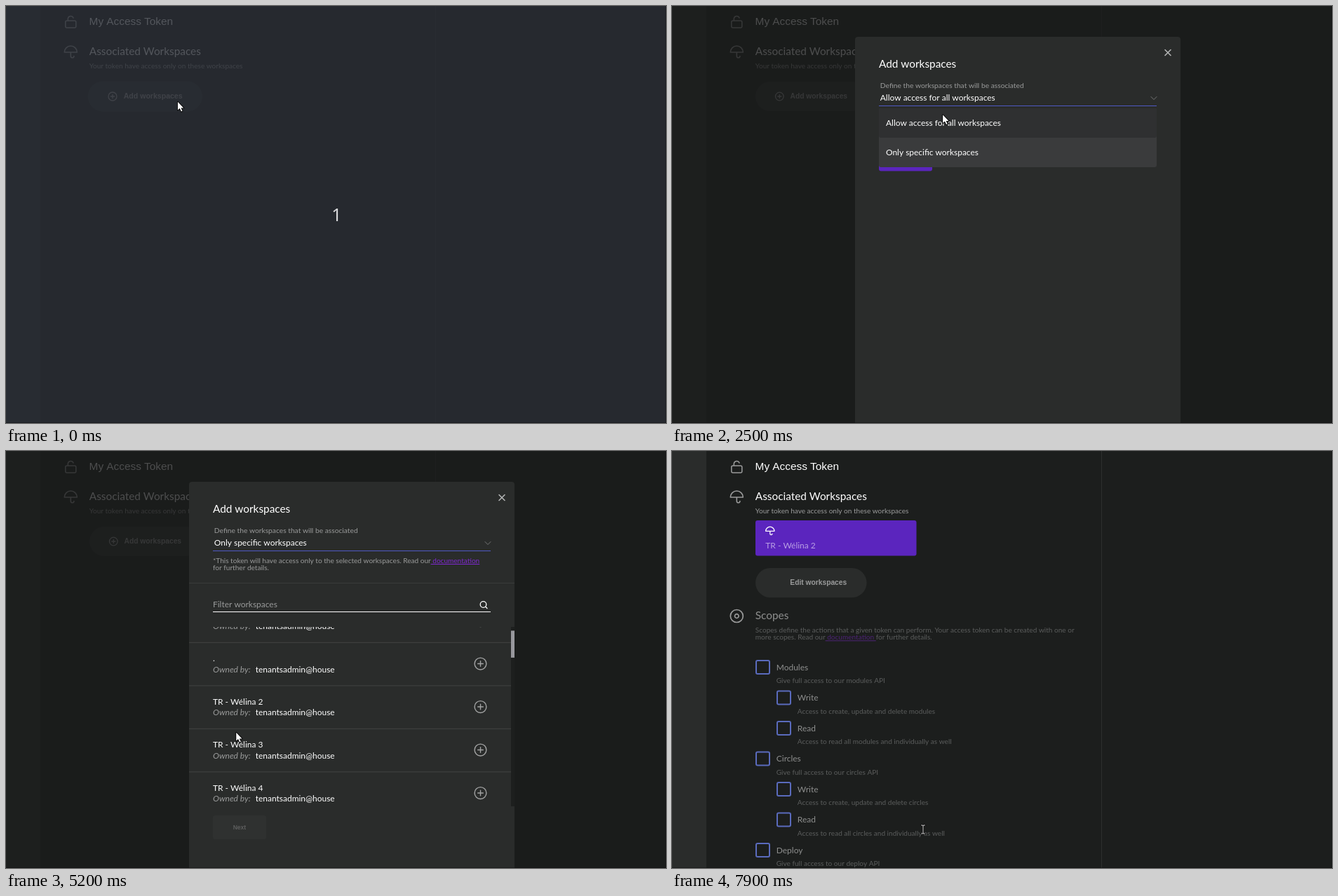
These frames come from a looping animation (941x595 px, 8000 ms). An HTML page with a canvas:

```html
<!DOCTYPE html>
<html lang="en">
<head>
<meta charset="utf-8">
<title>Access token workspaces</title>
<style>
  html, body { margin: 0; width: 100%; height: 100%; overflow: hidden; background: #1c1e1d; }
  canvas { display: block; }
</style>
</head>
<body>
<canvas id="stage" width="941" height="595"></canvas>
<script>
const ctx = document.getElementById('stage').getContext('2d');
const DURATION = 8000, STEP = 100;
const LATO = 'Lato, sans-serif', ARIAL = '"Liberation Sans", Arial, sans-serif';
const BIG = 15.37, MID = 11.96, LABEL = 10.25, SMALL = 10.07, TINY = 8.54;
const PAGE = '#1c1e1d', PANEL = '#2a2c2b', GREY = '#9a9b9b', WHITE = '#fff';
const PURPLE = '#5b25be', BLUE = '#4f59c4', LINK = '#7e28cf';
const WORKSPACES = [',j', '.', 'TR - Wélina 2', 'TR - Wélina 3', 'TR - Wélina 4'];
const OWNER = 'tenantsadmin@house';
const OPTIONS = ['Allow access for all workspaces', 'Only specific workspaces'];
const SCOPES = ['Modules', 'Circles', 'Deploy'];

// time, x, y of the pointer's hot spot
const POINTER = [
  [0, 244, 135], [1300, 244, 135], [1400, 300, 178], [1500, 366, 211], [1600, 380, 198],
  [1900, 404, 141], [2000, 407, 141], [2300, 388, 140], [2400, 388, 140], [2800, 377, 194],
  [3500, 377, 194], [3900, 347, 396], [4000, 267, 420], [4300, 267, 420], [4400, 283, 421],
  [4500, 283, 421], [5400, 340, 394], [5700, 367, 371], [6000, 367, 371], [6400, 705, 366],
  [6500, 678.5, 360], [7000, 678.5, 360], [7600, 358, 536], [7800, 358, 536], [7900, 358, 540]
];
const HAND_TIMES = [[100, 1000], [1500, 1700], [6500, 7200], [7500, 7900]];
const ARROW = new Path2D('M.9 1.8V13.6L3.7 11.1 5.8 15.6 7.5 14.8 5.5 10.4H9.2Z');
const HAND = new Path2D('M-1.3 .8Q0-.7 1.3 .8V5L8 6.2Q9.3 6.6 9 8L8.2 12.8H1L-3.4 8.2Q-2.9 6.6-1.3 7.9Z');

const clamp = v => Math.max(0, Math.min(1, v));
const within = (t, ranges) => ranges.some(([from, to]) => t >= from && t < to);

function text(str, x, y, color = WHITE, size = MID, font = LATO, style = '') {
  ctx.font = `${style} ${size}px ${font}`;
  ctx.fillStyle = color;
  ctx.fillText(str, x, y);
  return x + ctx.measureText(str).width;
}

function link(str, x, y) {
  const end = text(str, x, y, LINK, SMALL);
  box(x, y + 1, end - x, 1, LINK);
  return end;
}

function box(x, y, w, h, color, radius = 0) {
  ctx.fillStyle = color;
  ctx.beginPath();
  ctx.roundRect(x, y, w, h, radius);
  ctx.fill();
}

function stroke(path, x, y, color = GREY, width = 1.5, scale = 1) {
  ctx.save();
  ctx.translate(x, y);
  ctx.scale(scale, scale);
  ctx.strokeStyle = color;
  ctx.lineWidth = width / scale;
  ctx.lineCap = ctx.lineJoin = 'round';
  ctx.stroke(new Path2D(path));
  ctx.restore();
}

const circle = r => `M${-r} 0a${r} ${r} 0 1 1 ${2 * r} 0a${r} ${r} 0 1 1 ${-2 * r} 0`;
const plus = r => `M${-r} 0H${r}M0 ${-r}V${r}`;
const UMBRELLA = 'M-9 0A9 9 0 0 1 9 0ZM0 0V5.5A2.3 2.3 0 0 0 4.6 5.5';
const LOCK = 'M-5.5 -2H5.5Q7.5 -2 7.5 0V6Q7.5 8 5.5 8H-5.5Q-7.5 8 -7.5 6V0Q-7.5 -2 -5.5 -2M-4 -2V-5A4 4 0 0 1 3.7 -6';

function zoomed(cx, cy, scale, draw) {
  ctx.save();
  ctx.translate(cx, cy);
  ctx.scale(scale, scale);
  ctx.translate(-cx, -cy);
  draw();
  ctx.restore();
}

function drawPage(t) {
  box(0, 0, 941, 595, PAGE);
  box(0, 0, 49, 595, PANEL);
  box(612, 0, 1, 595, '#2d2f2e');
  stroke(LOCK, 92.3, 23);
  text('My Access Token', 118.6, 26.5, WHITE, BIG, ARIAL);
  stroke(UMBRELLA, 92.3, 66, GREY, 1.6);
  text('Associated Workspaces', 118.8, 70, WHITE, BIG);
  text('Your token have access only on these workspaces', 118.8, 89, GREY, SMALL);
  if (t >= 7800) return drawResult(t);
  zoomed(198.3, 129, t < 1000 ? 1.03 : 1, () => {
    box(119, 108, 158.6, 42, PANEL, 21);
    stroke(circle(5.8) + plus(2.6), 153.3, 129, GREY, 1.3);
    text('Add workspaces', 168.6, 132.3, GREY, LABEL, ARIAL, 'bold');
  });
}

function drawResult(t) {
  box(119, 99, 229.5, 50.5, PURPLE, 3);
  stroke(UMBRELLA, 139.8, 114.3, WHITE, 1.3, .68);
  text(WORKSPACES[2], 133.3, 139.3, '#b9a0e4');
  box(119, 167, 158.6, 42, PANEL, 21);
  text('Edit workspaces', 168.3, 191.3, GREY, LABEL, ARIAL, 'bold');
  stroke(circle(9) + circle(2.8), 92.3, 235.5, GREY, 1.7);

  const fade = t < 7900 ? .25 : .5;
  ctx.globalAlpha = fade;
  text('Scopes', 118.8, 240.3, WHITE, BIG);
  text('Scopes define the actions that a given token can perform. Your access token can be created with one or', 118.8, 259, GREY, SMALL);
  let x = text('more scopes. Read our', 118.8, 269.3, GREY, SMALL);
  x = link(' documentation ', x, 269.3);
  text('for further details.', x, 269.3, GREY, SMALL);

  let y = 308.5;
  const scope = (label, note, indent) => {
    ctx.globalAlpha = 1;
    ctx.strokeStyle = '#5a6bbd';
    ctx.lineWidth = 2;
    ctx.beginPath();
    ctx.roundRect(120 + indent, y - 9.5, 19, 19, 2);
    ctx.stroke();
    ctx.globalAlpha = fade;
    text(label, 148.8 + indent, y + 4, WHITE);
    text(note, 148.8 + indent, y + 22.8, GREY, SMALL);
    y += 43.5;
  };
  for (const name of SCOPES) {
    const kind = name.toLowerCase();
    scope(name, `Give full access to our ${kind} API`, 0);
    if (y > 595) break;
    scope('Write', `Access to create, update and delete ${kind}`, 30);
    scope('Read', `Access to read all ${kind} and individually as well`, 30);
  }
  ctx.globalAlpha = 1;
}

function drawNext(cy, enabled, hovered) {
  zoomed(333, cy, hovered ? 1.08 : 1, () => {
    box(295, cy - 17, 76, 34, enabled ? PURPLE : '#2f3130', 3);
    text('Next', 323.7, cy + 3, enabled ? WHITE : '#5d5e5e', TINY, ARIAL, 'bold');
  });
}

function drawModal(t) {
  const specific = t >= 3100;
  const focused = t >= 2500 && t < 5500;
  box(261, 44, 464, 560, PANEL, 4);
  stroke('M-4 -4L4 4M4 -4L-4 4', 707, 66.5, '#b4b5b5', 1.6);
  text('Add workspaces', 295, 88, WHITE, BIG);
  text('Define the workspaces that will be associated', 296.8, 117, GREY, LABEL);
  text(OPTIONS[+specific], 296.8, 135);
  stroke('M-4 -2L0 2 4 -2', 687, 131.5, '#757676', 1);
  box(295, 142, 396, 1, focused ? BLUE : WHITE);

  const target = specific ? 'only to the' : 'to all';
  const x = text(`*This token will have access ${target} selected workspaces. Read our`, 295, 160, GREY, SMALL);
  if (specific) {
    link(' documentation', x, 160);
    text('for further details.', 295, 170.3, GREY, SMALL);
    drawList(t);
    drawNext(537, t >= 6800, t >= 7500);
  } else {
    text('for', link(' documentation ', x, 160), 160, GREY, SMALL);
    text('further details.', 295, 170.3, GREY, SMALL);
    drawNext(218.5, true, t >= 1500 && t < 1700);
    if (t >= 2500) drawMenu(t);
  }
}

function drawMenu(t) {
  box(295, 146, 396, 84, '#3a3b3c', 3);
  box(295, t < 2700 ? 146 : 188, 396, 42, '#2f3031', 3);
  OPTIONS.forEach((option, i) => text(option, 305, 171 + i * 42));
}

function drawList(t) {
  box(261, 188, 464, 1, '#3a3c3b');
  text('Filter workspaces', 295, 222.8, GREY);
  stroke(circle(4.3) + 'M3.2 3.2L5.5 5.5', 680.5, 219, WHITE, 1.3);
  box(295, 229, 396, 1, WHITE);
  if (t < 3200) return;

  const loading = t < 3600;
  const progress = clamp((t - 4500) / 900);
  const scroll = 45.5 * progress * progress * (3 - 2 * progress);
  ctx.save();
  ctx.beginPath();
  ctx.rect(261, 251, 464, 256);
  ctx.clip();
  if (loading) drawSkeleton(t);
  else WORKSPACES.forEach((name, i) => drawRow(name, 251 + i * 61.5 - scroll, i === 2 && t >= 6800));
  box(720, 251, 5, 256, '#1d1f1e');
  box(720, 251 + scroll * .135, 5, loading ? 248.5 : 38.5, '#98989d');
  ctx.restore();
}

function drawSkeleton(t) {
  const shine = 265 + (t - 3300) * .5;
  const band = ctx.createLinearGradient(shine - 28, 0, shine + 28, 0);
  band.addColorStop(0, '#3a3a3a');
  band.addColorStop(.5, '#2b2d2c');
  band.addColorStop(1, '#3a3a3a');
  for (let i = 0; i < 4; i++) box(261, 251 + i * 63, 459, 61.8, band);
}

function drawRow(name, y, chosen) {
  box(261, y, 459, 1.3, '#3d3f3e');
  text(name, 295, y + 27.3);
  text('Owned by:', 295, y + 43, GREY, MID, LATO, 'italic');
  text(OWNER, 355.8, y + 43);
  stroke(circle(8.4) + (chosen ? 'M-3.5 0L-1 2.7 3.7 -2.7' : plus(3.8)), 676.5, y + 30.8, '#a2a3a3', 1.4);
}

function drawPointer(t) {
  const i = Math.max(1, POINTER.findIndex(key => key[0] >= t));
  const [t0, x0, y0] = POINTER[i - 1], [t1, x1, y1] = POINTER[i];
  const k = clamp((t - t0) / (t1 - t0));
  const x = x0 + (x1 - x0) * k, y = y0 + (y1 - y0) * k;
  if (t >= 7900) {
    const beam = 'M-2.5 -6H-.8Q0 -6 0 -5Q0 -6 .8 -6H2.5M0 -5V5M-2.5 6H-.8Q0 6 0 5Q0 6 .8 6H2.5';
    stroke(beam, x, y, '#000', 2.4);
    stroke(beam, x, y, '#ddd', 1);
    return;
  }
  const shape = within(t, HAND_TIMES) ? HAND : ARROW;
  ctx.save();
  ctx.translate(x, y);
  ctx.lineJoin = 'round';
  ctx.lineWidth = 1.8;
  ctx.strokeStyle = '#000';
  ctx.stroke(shape);
  ctx.fillStyle = WHITE;
  ctx.fill(shape);
  ctx.restore();
}

function render(t) {
  drawPage(t);
  if (t >= 900 && t < 7800) {
    ctx.globalAlpha = clamp((t - 800) / 400);
    box(0, 0, 941, 595, 'rgba(26,28,27,.78)');
    drawModal(t);
    ctx.globalAlpha = 1;
  }
  if (t < 100) {
    box(0, 0, 941, 595, 'rgba(40,44,52,.8)');
    ctx.textAlign = 'center';
    text('1', 471.5, 306.8, '#d9dadc', 25, '"Noto Sans", sans-serif');
    ctx.textAlign = 'left';
  }
  box(940, 0, 1, 595, 'rgba(0,0,0,.35)');
  box(0, 594, 941, 1, 'rgba(0,0,0,.35)');
  drawPointer(t);
}

const start = performance.now();
function tick() {
  const elapsed = (performance.now() - start) % DURATION;
  render(Math.floor(elapsed / STEP) * STEP);
  requestAnimationFrame(tick);
}
tick();
</script>
</body>
</html>
```
